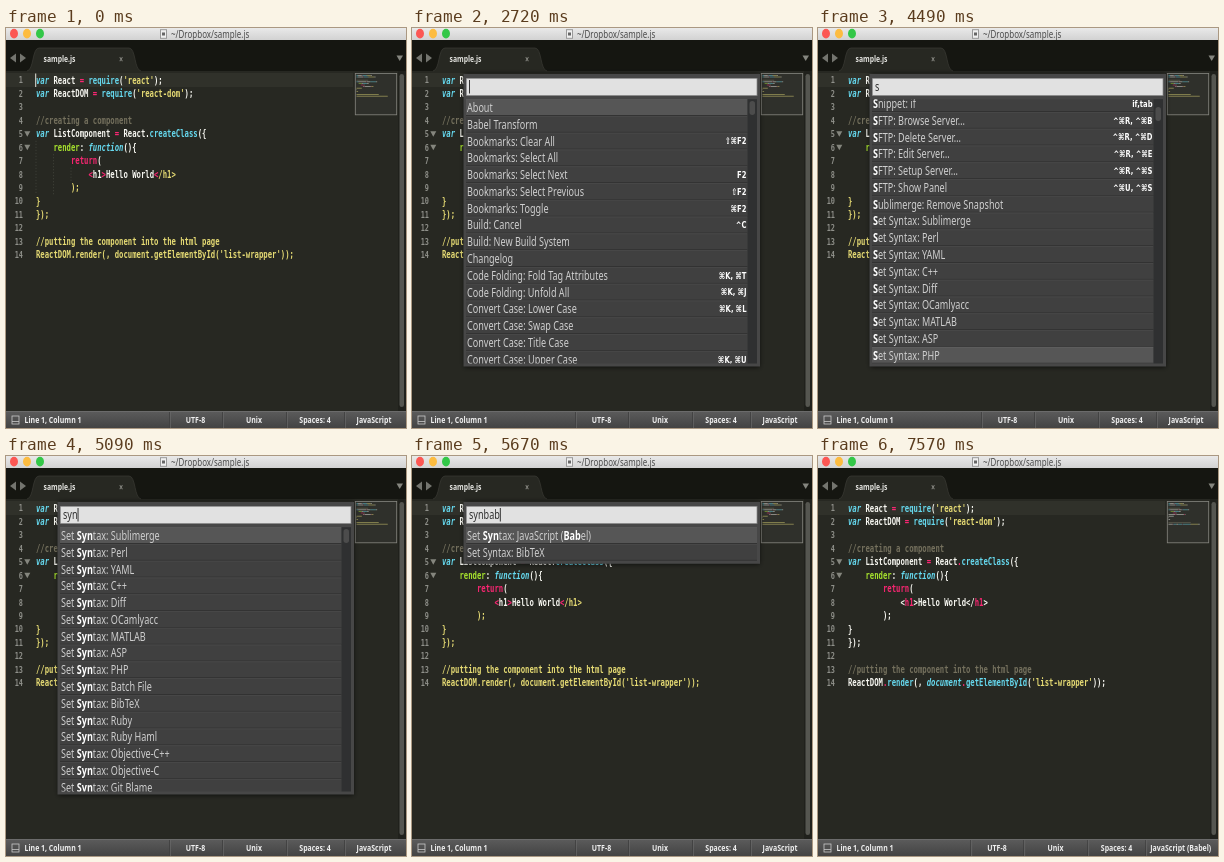
Animation, 400 px wide and 400 px high, one loop 8 s. Source, as an HTML page with a canvas:

```html
<!DOCTYPE html>
<html lang="en">
<head>
<meta charset="utf-8">
<title>Editor command palette</title>
<style>
html, body { margin: 0; width: 100%; height: 100%; overflow: hidden; background: #272822; }
canvas { display: block; width: 400px; height: 400px; }
</style>
</head>
<body>
<canvas id="stage"></canvas>
<script>
const canvas = document.getElementById('stage');
const ctx = canvas.getContext('2d');
const dpr = window.devicePixelRatio || 1;
canvas.width = canvas.height = 400 * dpr;

const LOOP = 8000;
const SQUEEZE = 0.726; // the whole screen is narrowed horizontally
const UI = '"Noto Sans", "DejaVu Sans", sans-serif';
const KEYS = '"DejaVu Sans", sans-serif';
const MONO = '"DejaVu Sans Mono", monospace';
const CHAR = 4.37, LINE = 13.46, ROW = 16.78, LIST_TOP = 71.2, LIST_BOTTOM = 335.5;

const COLORS = {
  w: '#f8f8f2', p: '#f92672', c: '#66d9ef', i: '#66d9ef',
  y: '#e6db74', g: '#a6e22e', m: '#75715e'
};

// Each segment begins with its colour key; "i" is also italic.
const HEAD = [
  "ivar|w React |p=|c require|w(|y'react'|w);",
  "ivar|w ReactDOM |p=|c require|w(|y'react-dom'|w);",
  '',
  'm//creating a component',
  'ivar|w ListComponent |p=|w React.|ccreateClass|w({',
  'w    |grender|w: |ifunction|w(){',
  'w        |preturn|w('
];
const PLAIN = [...HEAD,
  'w            |p<|wh1|p>|wHello World|p<|y/h1>',
  'y        );', 'y}', 'y});', '',
  'y//putting the component into the html page',
  "yReactDOM.render(, document.getElementById('list-wrapper'));"
];
const BABEL = [...HEAD.map(s => s.replace('React.|', 'React|p.|')),
  'w            <|ph1|w>Hello World</|ph1|w>',
  'w        );', 'w}', 'w});', '',
  'm//putting the component into the html page',
  "wReactDOM|p.|crender|w(, |idocument|p.|cgetElementById|w(|y'list-wrapper'|w));"
];

// Palette rows: braces mark matched letters, a tab precedes the shortcut.
const syntaxRows = (match, names) =>
  names.split(';').map(name => `Set ${'Syntax'.replace(match, '{$&}')}: ${name}`);
const plainRows = names => syntaxRows('-', names);
const SYNTAXES = 'Sublimerge;Perl;YAML;C++;Diff;OCamlyacc;MATLAB;ASP;PHP';
const MORE = ';Batch File;BibTeX;Ruby;Ruby Haml;Objective-C++;Objective-C;Git Blame';

const LISTS = {
  '': ['About', 'Babel Transform', 'Bookmarks: Clear All\t⇧⌘F2', 'Bookmarks: Select All',
    'Bookmarks: Select Next\tF2', 'Bookmarks: Select Previous\t⇧F2', 'Bookmarks: Toggle\t⌘F2',
    'Build: Cancel\t^C', 'Build: New Build System', 'Changelog',
    'Code Folding: Fold Tag Attributes\t⌘K, ⌘T', 'Code Folding: Unfold All\t⌘K, ⌘J',
    'Convert Case: Lower Case\t⌘K, ⌘L', 'Convert Case: Swap Case',
    'Convert Case: Title Case', 'Convert Case: Upper Case\t⌘K, ⌘U'],
  s: ['{S}nippet: if\tif,tab', '{S}FTP: Browse Server…\t^⌘R, ^⌘B',
    '{S}FTP: Delete Server…\t^⌘R, ^⌘D', '{S}FTP: Edit Server…\t^⌘R, ^⌘E',
    '{S}FTP: Setup Server…\t^⌘R, ^⌘S', '{S}FTP: Show Panel\t^⌘U, ^⌘S',
    '{S}ublimerge: Remove Snapshot', ...syntaxRows('S', SYNTAXES).map(row => row.replace('Set {S}', '{S}et S'))],
  sy: syntaxRows('Sy', SYNTAXES + MORE),
  syn: syntaxRows('Syn', SYNTAXES + MORE),
  synb: [...syntaxRows('Syn', '{B}atch File;{B}ibTeX;JavaScript ({B}abel);Shell Script ({B}ash);' +
    'NAnt {B}uild File;Git {B}lame;MATLA{B};Ru{b}y;Ru{b}y Haml;Ru{b}y on Rails;O{b}jective-C++;O{b}jective-C'),
    ...plainRows('Sublimerge;HTML;Perl;YAML')],
  synba: [...syntaxRows('Syn', '{Ba}tch File;JavaScript ({Ba}bel);Shell Script ({Ba}sh)'),
    ...plainRows('NAnt Build File'), ...syntaxRows('Syn', 'Git {B}l{a}me'),
    ...plainRows('BibTeX;MATLAB'),
    ...syntaxRows('Syn', 'Ru{b}y H{a}ml;Ru{b}y on R{a}ils'),
    ...plainRows('Sublimerge;Ruby;Objective-C++;Objective-C')],
  synbab: [...syntaxRows('Syn', 'JavaScript ({Bab}el)'), ...plainRows('BibTeX')]
};

// [start ms, palette query or null when closed, caret opacity]
const STEPS = [
  [0, null, 0.9], [110, null, 0.6], [230, null, 0.3], [350, null, 0], [1780, null, 0.8],
  [2250, null, 0.4], [2360, null, 0], [2720, '', 1], [3190, '', 0.4], [3300, '', 0],
  [3660, '', 1], [3780, 's', 1], [4380, 's', 0.4], [4490, 's', 0], [4850, 'sy', 1],
  [5090, 'syn', 1], [5440, 'synb', 1], [5560, 'synba', 0.6], [5670, 'synbab', 1],
  [6270, 'synbab', 0], [6620, 'synbab', 0.4], [6740, 'synbab', 0.7], [6860, 'synbab', 1],
  [6980, null, 0.9], [7450, null, 0.4], [7570, null, 0]
];
const BABEL_AT = 7090, PALETTE_AT = 2720, SCROLLED_AT = 3900;

function rect(x, y, w, h, fill) {
  ctx.fillStyle = fill;
  ctx.fillRect(x, y, w, h);
}

function pill(x, y, w, h, fill) {
  ctx.fillStyle = fill;
  ctx.beginPath();
  ctx.roundRect(x, y, w, h, w / 2);
  ctx.fill();
}

function shape(fill, ...points) {
  ctx.fillStyle = fill;
  ctx.beginPath();
  points.forEach(([x, y]) => ctx.lineTo(x, y));
  ctx.fill();
}

function shade(y, h, top, bottom) {
  const gradient = ctx.createLinearGradient(0, y, 0, y + h);
  gradient.addColorStop(0, top);
  gradient.addColorStop(1, bottom);
  return gradient;
}

// Draws text centred vertically on y and returns its width on screen.
function text(str, x, y, font, fill, align = 'left') {
  ctx.save();
  ctx.translate(x, y);
  ctx.scale(SQUEEZE, 1);
  ctx.font = font;
  ctx.fillStyle = fill;
  ctx.textAlign = align;
  ctx.textBaseline = 'alphabetic';
  ctx.fillText(str, 0, parseFloat(font.match(/[\d.]+px/)[0]) * 0.35);
  const width = ctx.measureText(str).width * SQUEEZE;
  ctx.restore();
  return width;
}

function drawWindow() {
  rect(0, 0, 400, 400, '#272822');
  rect(0, 0, 400, 12, shade(0, 12, '#e9e9e9', '#d2d2d2'));
  ['#fc5753', '#fdbc40', '#33c748'].forEach((color, i) => {
    ctx.fillStyle = color;
    ctx.beginPath();
    ctx.ellipse(8 + i * 13, 5.6, 4, 4.9, 0, 0, 7);
    ctx.fill();
  });
  rect(154, 1.2, 7, 9.6, '#9a9a9a');
  rect(155, 2.2, 5, 7.6, '#f0f0f0');
  rect(156, 4.5, 3, 3, '#666');
  text('~/Dropbox/sample.js', 165, 6, `11px ${UI}`, '#4c4c4c');

  rect(0, 12, 400, 31, '#151611');
  ctx.fillStyle = '#272822';
  ctx.beginPath();
  ctx.moveTo(21, 43);
  ctx.bezierCurveTo(28, 42, 26, 20, 33, 20);
  ctx.lineTo(123, 20);
  ctx.bezierCurveTo(130, 20, 128, 42, 135, 43);
  ctx.fill();
  ctx.strokeStyle = '#3b3c35';
  ctx.lineWidth = 0.7;
  ctx.stroke();
  shape('#74756f', [4, 30], [10, 25.5], [10, 34.5]);
  shape('#74756f', [20, 30], [14, 25.5], [14, 34.5]);
  shape('#85867f', [390.5, 27.5], [397, 27.5], [393.7, 33]);
  text('sample.js', 37.5, 31, `bold 9.4px ${UI}`, '#e4e4e0');
  text('×', 115, 31, `bold 10px ${UI}`, '#8b8b85', 'center');
}

function drawCode(lines, guides) {
  rect(0, 45, 347, 14, '#30312a');
  lines.forEach((line, n) => {
    const y = 52 + n * LINE;
    text(n + 1, 17, y, `bold 9.5px ${MONO}`, '#8f908a', 'right');
    if (n === 4 || n === 5) shape('#85867e', [18.3, y - 2.5], [24.3, y - 2.5], [21.3, y + 3]);
    let col = 0;
    for (const part of line ? line.split('|') : []) {
      const key = part[0], str = part.slice(1);
      const style = key === 'i' ? 'italic bold' : 'bold';
      text(str, 30 + col * CHAR, y, `${style} 10px ${MONO}`, COLORS[key]);
      if (str.trim()) {
        ctx.globalAlpha = 0.55;
        rect(350.5 + col * 0.53, 47 + n * 1.6, str.length * 0.53, 0.8, COLORS[key]);
        ctx.globalAlpha = 1;
      }
      col += str.length;
    }
  });
  if (guides) {
    ctx.strokeStyle = '#55564e';
    ctx.lineWidth = 0.6;
    ctx.setLineDash([1, 2]);
    [[30, 5, 9], [47.5, 6, 9], [65, 7, 8]].forEach(([x, from, to]) => {
      ctx.beginPath();
      ctx.moveTo(x, 45.5 + from * LINE);
      ctx.lineTo(x, 45.5 + to * LINE);
      ctx.stroke();
    });
    ctx.setLineDash([]);
  }
  rect(349, 45, 42, 42, 'rgba(255,255,255,.04)');
  ctx.strokeStyle = '#85857f';
  ctx.lineWidth = 0.8;
  ctx.strokeRect(349.3, 45.4, 41.4, 41.4);
  rect(392, 43, 8, 340, '#20211c');
  pill(393.5, 46, 4.5, 333, '#555650');
}

function drawStatus(babel) {
  const font = `600 9.6px ${UI}`, color = '#f0f0f0';
  rect(0, 383, 400, 17, shade(383, 17, '#5c5c5c', '#434343'));
  rect(0, 383, 400, 0.8, '#707070');
  ctx.strokeStyle = '#c8c8c8';
  ctx.lineWidth = 0.8;
  ctx.strokeRect(6, 388, 7, 8);
  rect(6, 393, 7, 0.8, '#c8c8c8');
  text('Line 1, Column 1', 18.5, 392, font, color);
  const shift = babel ? -10.5 : 0;
  const cells = ['UTF-8', 'Unix', 'Spaces: 4', babel ? 'JavaScript (Babel)' : 'JavaScript'];
  const edges = [163, 216, 280, 338].map(x => x + shift).concat(398);
  cells.forEach((label, i) => {
    rect(edges[i], 384, 0.8, 16, '#343434');
    rect(edges[i] + 0.8, 384, 0.8, 16, '#6c6c6c');
    text(label, (edges[i] + edges[i + 1]) / 2, 392, font, color, 'center');
  });
}

function drawRow(row, y, selected, right) {
  rect(54, y, right - 54, ROW, selected ? '#565656' : '#404040');
  rect(54, y, right - 54, 0.8, selected ? '#606060' : '#494949');
  rect(54, y + ROW - 0.9, right - 54, 0.9, '#303030');
  const [label, keys] = row.split('\t');
  let x = 55;
  label.split(/[{}]/).forEach((part, i) => {
    const match = i % 2;
    x += text(part, x, y + 8.4, `${match ? 'bold' : '500'} 12.5px ${UI}`, match ? '#fff' : '#cfcfcf');
  });
  if (keys) text(keys, 334.5, y + 8.4, `bold 9.4px ${KEYS}`, '#fff', 'right');
}

function drawPalette(query, caret, time) {
  const rows = LISTS[query];
  const scrolls = rows.length > 13;
  const bottom = scrolls ? LIST_BOTTOM : LIST_TOP + rows.length * ROW;
  const offset = query === 's' && time >= SCROLLED_AT ? 4 : 0;
  const selected = query === 's' ? 15 : 0;
  const right = scrolls ? 335.5 : 345;

  ctx.save();
  ctx.shadowColor = 'rgba(0,0,0,.7)';
  ctx.shadowBlur = 5 * dpr;
  rect(51.5, 46, 296.5, bottom + 3 - 46, '#474747');
  ctx.restore();
  rect(54, 50, 291.5, 18, '#777');
  rect(54.7, 50.7, 290, 16.5, '#e1e1e1');
  const width = text(query, 57, 59, `12.5px ${UI}`, '#303030');
  ctx.globalAlpha = caret;
  rect(57 + width, 52, 0.9, 13.5, '#222');
  ctx.globalAlpha = 1;

  ctx.save();
  ctx.beginPath();
  ctx.rect(54, LIST_TOP, 291.5, bottom - LIST_TOP);
  ctx.clip();
  rows.forEach((row, i) => drawRow(row, LIST_TOP + i * ROW - offset, i === selected, right));
  ctx.restore();
  if (scrolls) {
    rect(335.5, LIST_TOP, 9.5, bottom - LIST_TOP, '#2f3031');
    pill(337.5, query === 's' ? 79 : 73, 5.5, 14, '#4c4c4c');
  }
}

function draw(now) {
  const time = now % LOOP;
  const [, query, caret] = STEPS.findLast(step => step[0] <= time);
  const babel = time >= BABEL_AT;
  ctx.setTransform(dpr, 0, 0, dpr, 0, 0);
  drawWindow();
  drawCode(babel ? BABEL : PLAIN, time < PALETTE_AT);
  drawStatus(babel);
  if (query === null) {
    ctx.globalAlpha = caret;
    rect(29.2, 45.5, 1, 13.5, '#f8f8f0');
    ctx.globalAlpha = 1;
  } else {
    drawPalette(query, caret, time);
  }
}

const start = performance.now();
function tick() {
  draw(Math.max(0, performance.now() - start));
  requestAnimationFrame(tick);
}
tick();
</script>
</body>
</html>
```
